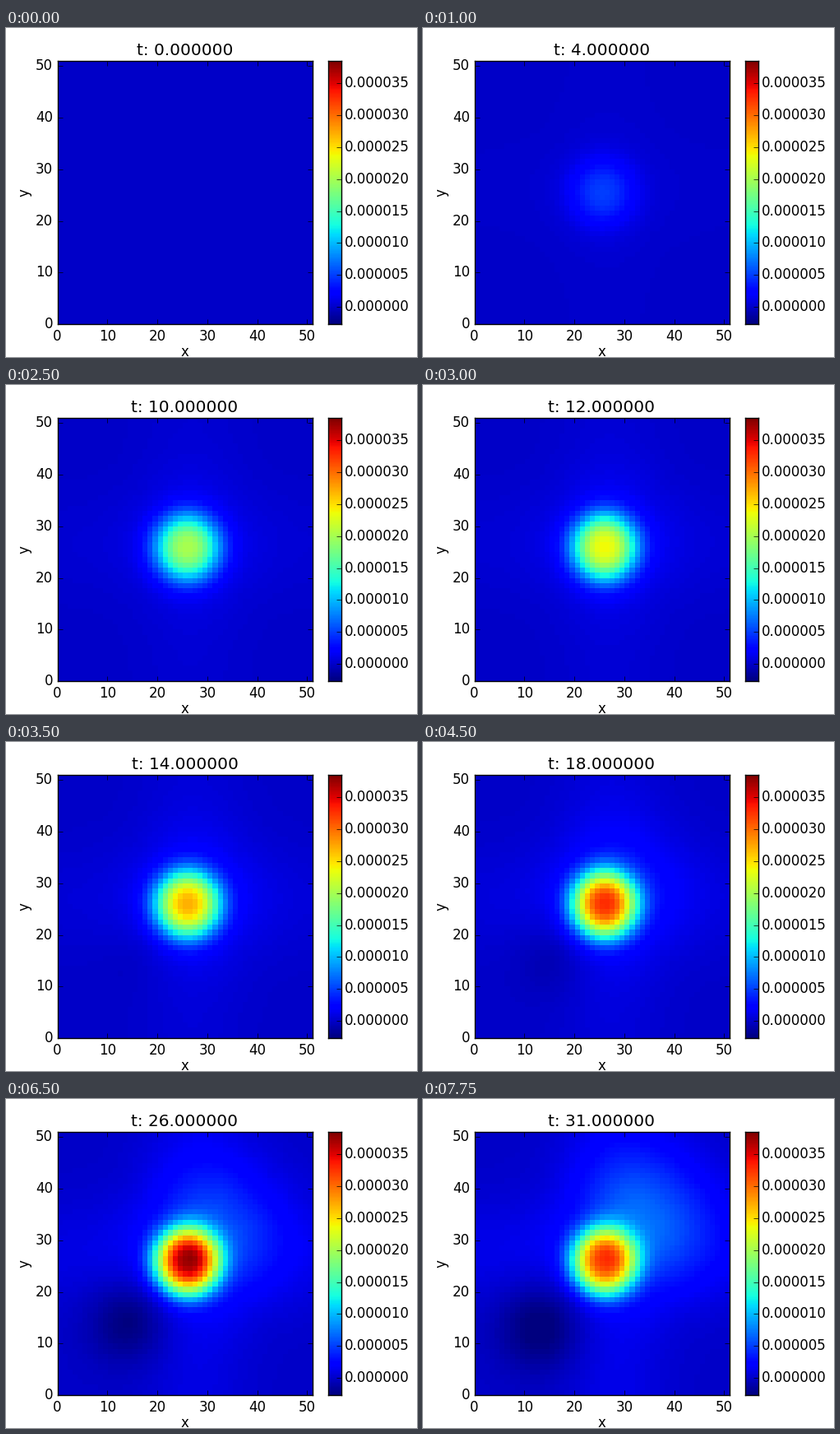
A matplotlib script that plays this animation: 500 by 400 pixels, repeating every 8 s.

```python
import numpy as np
import matplotlib.pyplot as plt
from matplotlib.animation import FuncAnimation

plt.rcParams.update({
    "font.family": "DejaVu Sans", "font.size": 12,
    "axes.linewidth": 1.0, "figure.dpi": 100,
})

W, H = 500, 400
N = 51                      # grid cells per side
STEPS, INTERVAL = 32, 250
VMIN, VMAX = -2.63, 38.4    # field range, in units of 1e-6

# Height of the central peak over time
PEAK_T = np.array([0, 2, 4, 10, 14, 18, 22, 24, 31.0])
PEAK_V = np.array([0, 1.5, 5, 20.2, 27, 32.8, 37.8, 38.3, 32.6])
PEAK_S = np.gradient(PEAK_V, PEAK_T)
PEAK_S[0] = 0


def peak(t):
    """Smooth cubic curve through the peak heights."""
    i = min(np.searchsorted(PEAK_T, t, side="right") - 1, len(PEAK_T) - 2)
    h = PEAK_T[i + 1] - PEAK_T[i]
    u = (t - PEAK_T[i]) / h
    return ((1 + 2 * u) * (1 - u) ** 2 * PEAK_V[i]
            + u * (1 - u) ** 2 * h * PEAK_S[i]
            + u * u * (3 - 2 * u) * PEAK_V[i + 1]
            + u * u * (u - 1) * h * PEAK_S[i + 1])


def gauss(d2, sigma):
    return np.exp(-d2 / (2 * sigma ** 2))


def background(x, y, t):
    """Drifting halo, faint cross and the trough at lower left."""
    s = t / 31
    c = 26 + 8 * s ** 2
    halo = 6.2 * s ** 1.2 * gauss((x - c) ** 2 + (y - c) ** 2, 8 + 1.5 * s)
    m = 26 + 2 * s
    cross = 1.2 * s * np.maximum(gauss((x - m) ** 2, 7), gauss((y - m) ** 2, 7))
    depth = np.interp(t, [12, 18, 22, 31], [0, 1.1, 2.5, 3.2])
    d = 15.5 - 2.3 * np.clip((t - 20) / 11, 0, 1)
    trough = depth * gauss((x - d) ** 2 + (y - d) ** 2, 4 + 1.7 * s)
    return halo + cross - trough


def field(t):
    x, y = np.meshgrid(np.arange(N) + 0.5, np.arange(N) + 0.5)
    c = min(25.3 + 0.06 * t, 25.95)
    r = np.hypot(x - c, y - c)
    core = np.exp(-(r / 6.4) ** (2.3 + 0.4 * min(t / 22, 1)))
    return background(x, y, t) + (peak(t) - background(26, 26, t)) * core


fig = plt.figure(figsize=(W / 100, H / 100), facecolor="white")

ax = fig.add_axes([0.125, 0.1, 0.62, 0.8])
mesh = ax.imshow(field(0), cmap="jet", vmin=VMIN, vmax=VMAX, origin="lower",
                 extent=(0, N, 0, N), aspect="auto", interpolation="nearest")
ax.set_xticks(range(0, N, 10))
ax.set_yticks(range(0, N, 10))
ax.tick_params(direction="in", length=4, width=0.5, pad=4, top=True, right=True)
title = ax.set_title("", fontsize=14.4, pad=5, y=1.0)

bar = fig.add_axes([391.875 / W, 0.1, 16 / W, 0.8])
bar.imshow(np.linspace(0, 1, 256)[:, None], cmap="jet", origin="lower",
           extent=(0, 1, VMIN, VMAX), aspect="auto", interpolation="nearest")
levels = range(0, 36, 5)
bar.set_xticks([])
bar.set_yticks(levels, [f"{v * 1e-6:.6f}" for v in levels])
bar.yaxis.tick_right()
bar.tick_params(direction="in", length=4, width=0.5, pad=3)

for a in (ax, bar):
    plt.setp(a.get_yticklabels(), va="center")

fig.text(217.5 / W, 1 / H, "x", ha="center", va="baseline")
fig.text(27 / W, 0.5, "y", ha="center", va="baseline",
         rotation=90, rotation_mode="anchor")


def update(t):
    mesh.set_data(field(t))
    title.set_text(f"t: {t:.6f}")
    return mesh, title


anim = FuncAnimation(fig, update, frames=STEPS, interval=INTERVAL,
                     repeat=True, repeat_delay=0, blit=False)
plt.show()
```
